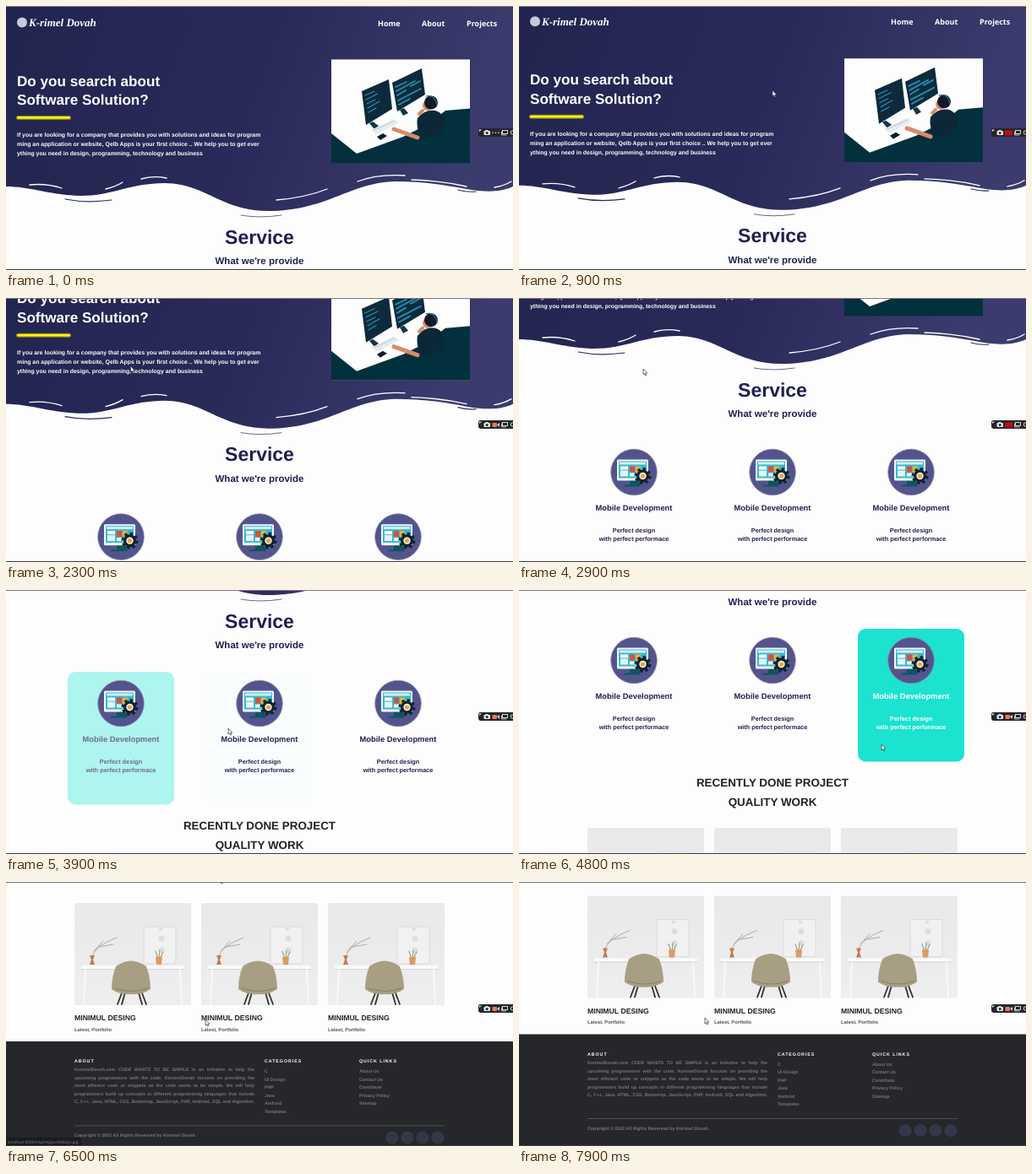
These frames come from a looping animation (600x313 px, 8000 ms). An HTML page:

```html
<!DOCTYPE html>
<html lang="en">
<head>
<meta charset="utf-8">
<style>
  html, body { margin: 0; width: 100%; height: 100%; overflow: hidden; background: #fdfdfe; }
  svg { display: block; font: bold 7px "Liberation Sans", Arial, sans-serif; text-rendering: geometricPrecision; }
  p { margin: 0; font-size: 5.3px; line-height: 9.5px; color: #777; text-align: justify; text-align-last: justify; }
</style>
</head>
<body>
<svg id="stage" width="600" height="313" viewBox="0 0 600 313"></svg>
<script>
const stage = document.getElementById('stage');
const NAVY = '#1f2050';

const text = (x, y, size, str, fill = '', more = '') =>
  `<text x="${x}" y="${y}" font-size="${size}" ${fill && `fill="${fill}"`} ${more}>${str}</text>`;
const mid = (x, y, size, str, fill) => text(x, y, size, str, fill, 'text-anchor="middle"');
const rect = (x, y, w, h, fill, more = '') =>
  `<rect x="${x}" y="${y}" width="${w}" height="${h}" fill="${fill}" ${more}/>`;
const disc = (x, y, r, fill, more = '') => `<circle cx="${x}" cy="${y}" r="${r}" fill="${fill}" ${more}/>`;
const shape = (d, fill) => `<path d="${d}" fill="${fill}"/>`;
const line = (d, color, w = 1, more = '') =>
  `<path d="${d}" fill="none" stroke="${color}" stroke-width="${w}" stroke-linecap="round" ${more}/>`;
const column = (x, y, step, size, lines, fill) =>
  lines.map((s, i) => text(x, y + i * step, size, s, fill)).join('');

const wave =
  shape('M0 0H600V214C585 221 568 221 545 217C515 211 490 208 460 208C405 210 380 243 310 243C255 243 235 210 188 210C145 210 125 226 85 225C48 223 28 214 0 214Z', 'url(#sky)') +
  line('M28 212Q48 210 66 216M118 217Q130 214 138 209M160 205Q175 201 190 204M320 230Q355 227 380 217M416 208Q440 199 472 201M480 206Q515 207 545 214M578 215Q590 213 598 208', '#fff', 1.3) +
  line('M70 229Q95 234 125 230M535 218Q545 221 556 220', '#2a2b5c', 1.2) +
  line('M278 248Q300 252 326 248', '#2a2b5c', 1, 'opacity=".7"');

const illustration =
  rect(385, 63.4, 164, 122.6, '#fdfdfe') +
  shape('M385 151L415 175L470 155L500 140L520 124L549 121.5V186.2H385Z', '#03303d') +
  shape('M430 139L434 137L441 142L436 146ZM466 123L471 121L476 127L470 130Z', '#123646') +
  shape('M421 101L453 87L457 122L426 141Z', '#0d2a3c') +
  shape('M457 91L492 74L496 105L463 125Z', '#0d2a3c') +
  line('M425 106L436 101M426 111L440 104M427 116L437 111M428 121L442 113M429 126L438 121', '#2596b5', 1.1) +
  line('M461 96L474 90M462 101L484 89M463 106L473 100M479 95L490 89M464 112L491 98M465 117L478 110', '#1f8fae', 1.9) +
  shape('M432 147L459 134L466 138L438 152Z', '#e4ecef') +
  line('M436 147L460 136', '#9fb3bb', .8, 'stroke-dasharray="1.5 1.5"') +
  shape('M439 155L446 151L451 154L443 159Z', '#101c2a') +
  line('M459 146L487 156', '#d98a68', 5) + line('M489 128L493 124', '#d98a68', 4) +
  shape('M487 133Q496 122 508 124Q521 128 519 145Q511 157 491 158Q485 143 487 133Z', '#0a2838') +
  disc(499, 118, 6, '#d98a68') + disc(503, 114.5, 8, '#101a2b') +
  line('M497 107Q508 105 510 117', '#2f6f80', 1.2);

const hero = wave + illustration +
  disc(19, 19.5, 6, '#c9c9dc') +
  text(27, 24, 13, 'K-rimel Dovah', '#fff', 'font-style="italic" font-family="Liberation Serif, serif"') +
  [[440, 'Home'], [492, 'About'], [545, 'Projects']].map(([x, s]) =>
    text(x, 23.5, 9, s, '#fff', 'font-family="Open Sans, sans-serif"')).join('') +
  column(13, 94.5, 22.5, 17.1, ['Do you search about', 'Software Solution?'], '#fff') +
  rect(12, 130, 65, 5, '#a8a52a', 'rx="2.5" opacity=".7"') + rect(13, 131, 63, 2.8, '#fbf500', 'rx="1.4"') +
  column(13, 155, 11, 6.9, [
    'If you are looking for a company that provides you with solutions and ideas for program',
    'ming an application or website, Qelb Apps is your first choice .. We help you to get ever',
    'ything you need in design, programming, technology and business'], '#fff');

const deviceIcon =
  disc(0, 0, 27.3, '#53548e', 'stroke="#8f86a0" stroke-width=".8"') +
  shape('M-5 9H5L8 17H-13L-10 15H-5Z', '#0d5560') +
  rect(-20, -15, 37, 25, '#f4f7f8', 'rx="1.5"') + rect(-18, -13, 33, 20, '#35b9d0') +
  rect(-17, -12, 31, 3, '#d5f0f4') + rect(-16, -7, 9, 4, '#fff') + rect(-16, -2, 9, 7, '#e8f3f4') +
  rect(-5, -7, 6, 7, '#d8503b') + rect(2, -7, 6, 7, '#f2b03c') + rect(-5, 1, 11, 4, '#e8f3f4') +
  disc(10.5, 4.5, 8, 'none', 'stroke="#10242e" stroke-width="4" stroke-dasharray="3.2 3.08"') +
  disc(10.5, 4.5, 7.5, '#10242e') + disc(10.5, 4.5, 4.2, '#f4f2ea') + disc(10.5, 4.5, 2.6, '#f0a33a');

const service = x =>
  `<g class="card"><rect class="glow" x="${x - 63}" y="334" width="126" height="157.5" rx="9" fill="#1ce2d0"/>
   <g transform="translate(${x} 371.5)">${deviceIcon}</g>` +
  mid(x, 417, 9.36, 'Mobile Development') +
  mid(x, 443, 7.3, 'Perfect design') + mid(x, 452.5, 7.3, 'with perfect performace') + '</g>';

const photo =
  rect(0, 0, 138, 121, 'url(#wall)', 'rx="2"') +
  rect(82, 28, 38, 44, '#f1f1f2', 'rx="2" stroke="#d6d6d9" stroke-width=".8"') +
  [42, 56].map(y => disc(103, y, 3.5, '#dcdde0')).join('') + disc(102, 31, 2, '#dcdde0') +
  line('M21 62Q26 50 50 41M23 57L34 45M28 52L46 49', '#b5aa9c', 1) +
  shape('M18 62H24L22 67L24 73H18L20 67Z', '#c77a52') +
  line('M99 66L96 57M100 66L101 56M101 66L105 58', '#9aa27c', 1.2) +
  shape('M96 64H104L103 73H97Z', '#dd9a62') +
  rect(8, 74, 122, 4, '#fbfbfb') + rect(8, 78, 122, 1, '#d3d3d6') +
  line('M13 79L11 120M125 79L127 120', '#f8f8f8', 2) +
  line('M57 104L51 120M60 106L56 120M76 106L80 120M79 104L85 120', '#35302c', 1.8) +
  shape('M49 75Q67 62 85 75Q90 88 90 102Q80 109 67 108Q53 109 44 102Q44 88 49 75Z', '#a89e84') +
  line('M48 101Q67 108 87 101', '#8a8068', 1.2);

const project = x =>
  `<g transform="translate(${x} 570)">${photo}</g>` +
  text(x, 709, 8.7, 'MINIMUL DESING', '#222') + text(x, 721.5, 5.8, 'Latest, Portfolio', '#555');

const heading = (x, s) => text(x, 759, 5.3, s, '#fff', 'letter-spacing=".95"');
const footer = rect(0, 734, 600, 140, '#26272b') +
  heading(81, 'ABOUT') + heading(306, 'CATEGORIES') + heading(418, 'QUICK LINKS') +
  `<foreignObject x="81" y="764.2" width="213" height="52"><p>
   KorimelDovah.com <i>CODE WANTS TO BE SIMPLE</i> is an initiative to help the<br>
   upcoming programmers with the code. KorimelDovah focuses on providing the<br>
   most efficient code or snippets as the code wants to be simple. We will help<br>
   programmers build up concepts in different programming languages that include<br>
   C, C++, Java, HTML, CSS, Bootstrap, JavaScript, PHP, Android, SQL and Algorithm.</p></foreignObject>` +
  column(306, 771, 9.5, 5.3, ['C', 'UI Design', 'PHP', 'Java', 'Android', 'Templates'], '#777') +
  column(418, 771, 9.5, 5.3, ['About Us', 'Contact Us', 'Contribute', 'Privacy Policy', 'Sitemap'], '#777') +
  rect(81, 833.6, 438, .8, '#57585c') +
  text(81, 847, 5.35, 'Copyright © 2022 All Rights Reserved by Korimel Dovah.', '#777') +
  [457, 475, 493, 511].map(x => disc(x, 848, 7.6, '#353748')).join('');

const recorder =
  shape('M600 145H561Q559 145 559 148V152Q559 155 562 155H600Z', '#25262a') +
  shape('M560 149V146.5H563Z', '#eee') +
  rect(565.5, 148, 7.5, 5, '#e6e6e6', 'rx="1"') + rect(567.5, 147, 3, 2, '#e6e6e6') + disc(569.2, 150.5, 1.5, '#25262a') +
  `<g id="dots">${[576, 579.5, 583].map(x => disc(x, 150.3, .8, '#eee')).join('')}</g>` +
  `<g id="idle">${rect(575.5, 148, 5.5, 5, '#e8785a', 'rx=".8"')}${shape('M581 150L584 148V153Z', '#f0cdbd')}</g>` +
  rect(575, 147.5, 9, 6, '#c40c10', 'id="live" rx=".8"') +
  rect(587.5, 147.5, 6, 4, 'none', 'stroke="#e6e6e6" stroke-width=".9"') + line('M586.5 149V153H592', '#e6e6e6', .8) +
  rect(597.5, 148, 4, 4, 'none', 'stroke="#e6e6e6" stroke-width=".9" rx="1"');

stage.innerHTML = `
  <defs>
    <linearGradient id="sky" y2=".15"><stop stop-color="#22244f"/><stop offset=".55" stop-color="#2a2a5a"/><stop offset="1" stop-color="#3b3b6d"/></linearGradient>
    <linearGradient id="wall" x2="0" y2="1"><stop stop-color="#e9e9eb"/><stop offset="1" stop-color="#eeeeef"/></linearGradient>
  </defs>
  <g id="page">${hero}
    ${mid(300, 281.6, 23, 'Service', NAVY)}${mid(300, 306.2, 11.5, "What we're provide", NAVY)}
    ${[136, 300, 464].map(service).join('')}
    ${mid(300, 521, 13.4, 'RECENTLY DONE PROJECT', '#222')}${mid(300, 543.5, 13.4, 'QUALITY WORK', '#222')}
    ${[81, 231, 381].map(project).join('')}${footer}
  </g>
  <g id="status">${rect(0, 303, 89, 10, '#1b1c1f')}${text(2, 310, 4.9, 'localhost:8080/img/img/portfolio/p1.jpg', '#77787c', 'font-weight="400"')}</g>
  ${rect(0, 0, 600, 1, '#77777c')}${rect(0, 312, 600, 1, '#3c3c40')}
  ${recorder}
  <g id="cursor">
    <path id="arrow" d="M0 0V7L1.6 5.6L2.7 8L3.8 7.5L2.8 5.2H4.8Z" fill="#fff" stroke="#333" stroke-width=".7"/>
    <path id="beam" d="M-1.5 -3H1.5M0 -3V4M-1.5 4H1.5" fill="none" stroke="#0c0c20" stroke-width=".8"/>
  </g>`;

const el = id => document.getElementById(id);
const cards = [...document.querySelectorAll('.card')];
const clamp = v => Math.max(0, Math.min(1, v));
const show = (id, on) => el(id).style.display = on ? '' : 'none';

// time, scroll offset, pointer x, pointer y
const track = [
  [0, 0, 580, 153], [900, 1.2, 300, 100], [1800, 2.5, 148, 78], [2700, 157, 147, 83],
  [2900, 165, 147, 84], [3000, 165, 147, 84], [3640, 215, 205, 148], [3900, 237, 263, 164],
  [4450, 265, 400, 177], [4800, 288, 429, 183], [5300, 400, 429, 183], [5400, 400, 429, 183],
  [6200, 530, 260, 167], [6500, 545, 236, 163], [7200, 550, 225, 162], [7900, 553.5, 220, 161],
  [8000, 553.5, 220, 161]];
// pointer enters and leaves each service card
const hovers = [[3200, 3640], [3895, 4350], [4400, 4860]];

function at(t) {
  const i = track.findIndex(k => k[0] > t);
  const a = track[i - 1], b = track[i], f = (t - a[0]) / (b[0] - a[0]);
  return a.map((v, n) => v + (b[n] - v) * f);
}

function draw(now) {
  const t = Math.floor(now % 8000 / 100) * 100;
  const [, scroll, x, y] = at(t);
  el('page').setAttribute('transform', `translate(0 ${-scroll})`);
  el('cursor').setAttribute('transform', `translate(${x} ${y})`);
  cards.forEach((card, i) => {
    const [enter, leave] = hovers[i];
    const h = clamp((t - enter) / 400) * (1 - clamp((t - leave) / 400));
    card.style.fill = `color-mix(in srgb, #fff ${h * 100}%, ${NAVY})`;
    card.querySelector('.glow').style.opacity = h;
  });
  const overText = t > 1500 && t < 2000;
  show('beam', overText);
  show('arrow', t > 200 && !overText);
  const live = t % 2000 >= 850 && t % 2000 < 1400;
  show('dots', t < 300);
  show('live', live);
  show('idle', t >= 300 && !live);
  show('status', t >= 6200 && t < 6900);
}

(function loop() {
  draw(performance.now());
  requestAnimationFrame(loop);
})();
</script>
</body>
</html>
```
